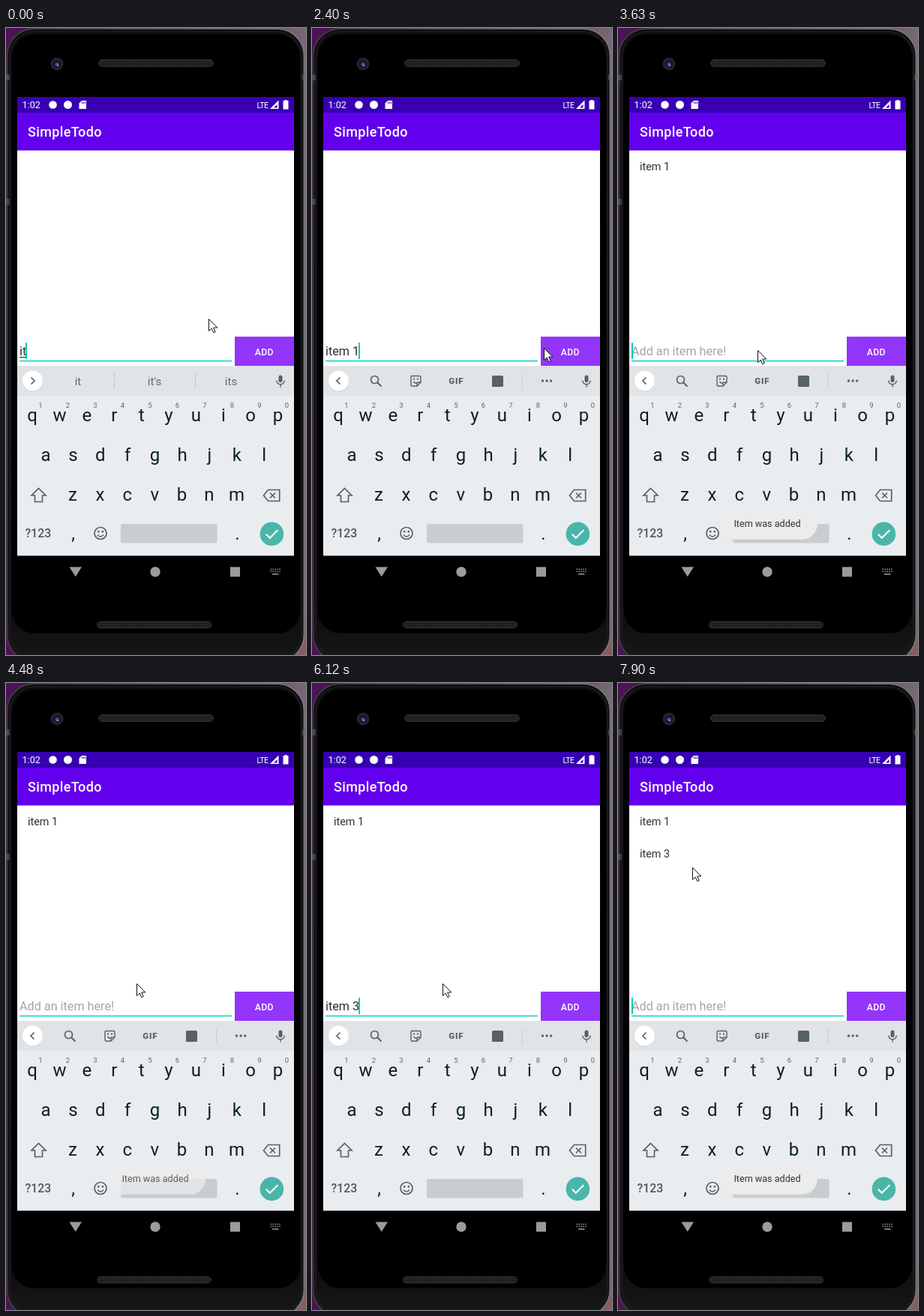
These frames come from a looping animation (400 by 837 pixels, 8 s). An HTML page:

```html
<!DOCTYPE html>
<html lang="en">
<head>
<meta charset="utf-8">
<title>Todo app demo</title>
<style>
  html, body { margin: 0; width: 100%; height: 100%; overflow: hidden; background: #24142f; }
  svg { display: block; width: 400px; height: 837px; font-family: Roboto, "Open Sans", sans-serif; }
  text { white-space: pre; }
  .mid { text-anchor: middle; }
  .key { font-size: 24px; fill: #0b2027; }
  .num { font-size: 9.5px; fill: #5c676d; }
  .word { font-size: 15px; fill: #5f6a71; }
  .item { font-size: 14.4px; fill: #303030; }
  .field { font-size: 16.2px; }
  .line { fill: none; stroke: #56626a; stroke-width: 1.7; }
  .gray { fill: #56626a; }
  .nav { fill: #9b9b9b; }
</style>
</head>
<body>
<svg viewBox="0 0 400 837">
  <defs>
    <linearGradient id="desk" x2="1" y2="0">
      <stop offset="0" stop-color="#4c1455"/><stop offset=".5" stop-color="#2a1735"/><stop offset="1" stop-color="#786878"/>
    </linearGradient>
    <linearGradient id="rim" x2="1" y2="0">
      <stop offset="0" stop-color="#3c3c3c"/><stop offset="1" stop-color="#767676"/>
    </linearGradient>
    <linearGradient id="body" x2="0" y2="1">
      <stop offset="0" stop-color="#0c0c0c"/><stop offset=".9" stop-color="#0a0a0a"/><stop offset="1" stop-color="#181818"/>
    </linearGradient>
    <pattern id="mesh" width="3" height="3" patternUnits="userSpaceOnUse">
      <rect width="3" height="3" fill="#1d1d1d"/><circle cx="1.5" cy="1.5" r=".8" fill="#323232"/>
    </pattern>
  </defs>

  <!-- phone -->
  <rect width="400" height="837" fill="url(#desk)"/>
  <path d="M370 790H400V837H370z" fill="#8a5c60"/>
  <rect x="1.5" y="1" width="396" height="845" rx="36" fill="url(#body)" stroke="url(#rim)" stroke-width="2"/>
  <rect x="5" y="5" width="389" height="837" rx="33" fill="none" stroke="#1b1b1b" stroke-width="2"/>
  <rect x="8" y="9" width="384" height="799" rx="30"/>
  <path d="M0 66H5M395 66H400M0 232H5" stroke="#6a6a6a" stroke-width="8" opacity=".5"/>
  <rect x="123.500" y="42.500" width="153" height="9" rx="4.500" fill="url(#mesh)" stroke="#303030"/>
  <rect x="121.500" y="792.500" width="152" height="8.500" rx="4.200" fill="url(#mesh)" stroke="#303030"/>
  <circle cx="68" cy="48" r="8.500" fill="#232429"/>
  <circle cx="68" cy="48" r="5" fill="#10152a"/>
  <circle cx="68" cy="48.500" r="2.500" fill="#3d4f96"/>
  <circle cx="69" cy="50" r="1" fill="#a4b4e8"/>

  <!-- app -->
  <path fill="#fff" d="M15 163H384V451H15z"/>
  <path fill="#3700b3" d="M15 92H384V113H15z"/>
  <path fill="#6200ee" d="M15 113H384V163.500H15z"/>
  <g fill="#fff">
    <text x="21.500" y="107" font-size="12.600">1:02</text>
    <circle cx="62.500" cy="102.500" r="5.300"/>
    <circle cx="82.500" cy="102.500" r="5.500"/>
    <path d="M101 97H107V108H97.500V100.500z"/>
    <path d="M101.500 98.500V101M103.500 98.500V101M105.500 98.500V101" stroke="#3700b3"/>
    <text x="334.500" y="106.500" font-size="10.500" letter-spacing="-.5">LTE</text>
    <path d="M363.500 96.500V108H352z"/>
    <path d="M361.500 102V106.500H357z" fill="#3700b3"/>
    <path d="M371.500 97V96H374.500V97H376.500V108.500H369.500V97z"/>
    <text x="29" y="145" font-size="18" font-weight="500" letter-spacing=".35">SimpleTodo</text>
  </g>
  <text id="first" class="item" x="29" y="190">item 1</text>
  <text id="second" class="item" x="29" y="233">item 3</text>
  <path id="button" d="M305 412H384V451H305z"/>
  <text class="mid" x="344.300" y="436.500" font-size="12.200" font-weight="500" letter-spacing=".4" fill="#fff">ADD</text>
  <path fill="#03d3c0" d="M18 443.700H301V445.200H18z"/>
  <text id="entry" class="field" x="18" y="437"></text>
  <rect id="compose" x="18" y="439" height="1" fill="#222"/>
  <rect id="caret" y="420" width="2" height="22" fill="#03cbb9"/>

  <!-- keyboard -->
  <path fill="#e9edf0" d="M15 451H384V705H15z"/>
  <path fill="#e0e4e7" d="M15 451H384V491H15z"/>
  <circle cx="35.500" cy="472" r="13.500" fill="#d0d4d7"/>
  <circle cx="35.500" cy="471" r="13.500" fill="#fff"/>
  <path id="chevron" class="line" d="M-2 -4.500L2.500 0L-2 4.500"/>
  <g class="gray">
    <rect x="363.500" y="463.500" width="5" height="9.500" rx="2.500"/>
    <path class="line" d="M360.700 470.500a5.300 5.300 0 0 0 10.600 0M366 476V479.500" style="stroke-width:1.400"/>
  </g>
  <g id="words">
    <path d="M144.500 460V482M252.500 460V482" stroke="#c3c8cb"/>
    <text class="word mid" x="96" y="477"></text>
    <text class="word mid" x="198" y="477"></text>
    <text class="word mid" x="300" y="477"></text>
  </g>
  <g id="tools">
    <circle class="line" cx="83.500" cy="469.500" r="5"/>
    <path class="line" d="M87 473L92.500 478.500" style="stroke-width:2"/>
    <path class="line" d="M133.500 464.500H143.500Q145 464.500 145 466V473L140 478H133.500Q132 478 132 476.500V466Q132 464.500 133.500 464.500M145 473H141Q140 473 140 474V478M135.500 472q2 3 4.500 1.500" style="stroke-width:1.400"/>
    <path class="gray" d="M135 467.500h2v2h-2zM140 467.500h2v2h-2z"/>
    <text class="gray mid" x="192.300" y="475.300" font-size="11.500" font-weight="900" letter-spacing=".8">GIF</text>
    <rect class="gray" x="240" y="464" width="15" height="15" rx="1.500"/>
    <path d="M280.500 461V482" stroke="#cbd0d3"/>
    <path d="M307.500 471H320" stroke="#56626a" stroke-width="3.400" stroke-linecap="round" stroke-dasharray="0 5.600"/>
  </g>
  <g id="keys"></g>
  <path class="line" d="M43.500 614.500L53 624H48.500V632.500H38.500V624H34z"/>
  <path class="line" d="M349.500 616.500H364.700V631.500H349.500L343.500 624zM352 620.500L359 627.500M359 620.500L352 627.500"/>
  <text x="25.500" y="680" font-size="15.800" font-weight="500" fill="#4d5960">?123</text>
  <circle class="line" cx="126" cy="674.500" r="8"/>
  <path class="line" d="M122 676.500q4 5 8 0" style="stroke-width:1.500"/>
  <path class="gray" d="M122 671h2.400v2.400h-2.400zM127.600 671h2.400v2.400h-2.400z"/>
  <rect x="153" y="662" width="128.500" height="25.500" rx="2.500" fill="#c8cdd0"/>
  <circle cx="354.400" cy="675.400" r="15.800" fill="#4bb5aa"/>
  <path d="M346.800 675.800L351.800 680.800L362.300 670.300" fill="none" stroke="#fff" stroke-width="2"/>

  <!-- navigation bar -->
  <path d="M15 704.500H384V747H15z"/>
  <path class="nav" d="M84.500 719.500H101L92.700 732.500z"/>
  <circle class="nav" cx="199" cy="726" r="6.700"/>
  <path class="nav" d="M299 719.500H312V732.500H299z"/>
  <path d="M352.500 722.500H366M352.500 725.500H366" stroke="#8d8d8d" stroke-width="1.700" stroke-dasharray="1.700 1.200"/>
  <path d="M355 729H363.500" stroke="#8d8d8d" stroke-width="1.700"/>

  <g id="toast">
    <rect x="134" y="641.500" width="132" height="42" rx="21" fill="#d9dddf" opacity=".5"/>
    <rect x="134" y="641" width="132" height="41.500" rx="20.700" fill="#ececed"/>
    <text class="mid" x="199" y="666" font-size="12.600" fill="#333">Item was added</text>
  </g>
  <path id="pointer" d="M.5 .5V16.500L4.200 13L6.800 18.700L9.200 17.600L6.700 12H11.800z" fill="#fff" stroke="#111"/>
</svg>
<script>
const LOOP = 8000;
const $ = id => document.getElementById(id);
const show = (id, on) => $(id).setAttribute('visibility', on ? 'visible' : 'hidden');

// Screen refreshes: [first, last, count]
const refreshes = [
  [0, 0, 1], [310, 310, 1], [870, 1020, 2], [1420, 1420, 1], [1980, 2970, 8], [3120, 4080, 8],
  [4200, 4200, 1], [4480, 5390, 7], [5690, 5690, 1], [5970, 6240, 3], [6610, 7600, 8], [7750, 7900, 2]
].flatMap(([a, b, n]) => Array.from({ length: n }, (_, i) => a + (b - a) * i / Math.max(1, n - 1)));

const typing = [
  [0, 'it'], [310, 'item'], [870, 'item '], [920, 'item 1'], [2520, ''], [4850, 'i'],
  [5200, 'it'], [5380, 'ite'], [5690, 'item'], [5960, 'item '], [6100, 'item 3'], [7450, '']
];
const suggestions = {
  i: ['i', 'I', "I'm"],
  it: ['it', "it's", 'its'],
  ite: ['ite', 'item', 'items'],
  item: ['item', 'items', 'itemized']
};
const path = [
  [0, 270, 388], [1900, 270, 388], [2400, 324, 442], [2750, 324, 442], [2970, 214, 447], [3257, 198, 438],
  [3500, 186, 430], [3700, 186, 430], [4080, 183, 418], [4200, 174, 401], [6500, 174, 401],
  [6751, 198, 412], [7100, 331, 440], [7600, 331, 440], [7900, 99, 246], [LOOP, 99, 246]
];
const toasts = [[2520, 4400], [7450, 9400]];
const presses = [[2500, 2800], [7400, 7700]];

const last = (list, t) => list.filter(e => e[0] <= t).pop();
const clamp = v => Math.min(1, Math.max(0, v));

function pointerAt(t) {
  const [t0, x0, y0] = last(path, t);
  const [t1, x1, y1] = path.find(p => p[0] > t);
  const k = (t - t0) / (t1 - t0);
  return [Math.round(x0 + (x1 - x0) * k), Math.round(y0 + (y1 - y0) * k)];
}

function buildKeys() {
  const label = (cls, x, y, s) => `<text class="${cls} mid" x="${x}" y="${y}">${s}</text>`;
  const row = (s, x, y) => [...s].map((c, i) => label('key', x + 36.4 * i, y, c)).join('');
  $('keys').innerHTML = row('qwertyuiop', 35, 525) + row('asdfghjkl', 53, 578) + row('zxcvbnm', 89, 631) +
    [...'1234567890'].map((c, i) => label('num', 46 + 36.5 * i, 507, c)).join('') +
    label('key', 89.5, 683, ',') + label('key', 308.5, 683, '.');
}

function draw(now) {
  const t = refreshes.filter(r => r <= now).pop();
  const [typedAt, text] = last(typing, t);
  const words = suggestions[text];

  const entry = $('entry');
  entry.textContent = text || 'Add an item here!';
  entry.setAttribute('fill', text ? '#2b2b2b' : '#a5a5a5');
  const width = text ? entry.getComputedTextLength() : 0;
  $('caret').setAttribute('x', Math.max(18, Math.round(17 + width)));
  show('caret', (t - typedAt) % 1000 < 500);
  $('compose').setAttribute('width', width);
  show('compose', words);

  show('words', words);
  show('tools', !words);
  if (words) $('words').querySelectorAll('text').forEach((e, i) => e.textContent = words[i]);
  $('chevron').setAttribute('transform', `translate(35.500 471) scale(${words ? 1 : -1} 1)`);

  show('first', t >= 2520);
  show('second', t >= 7450);
  $('button').setAttribute('fill', presses.some(([a, b]) => t >= a && t < b) ? '#9b43ff' : '#9335fb');
  $('toast').setAttribute('opacity', Math.max(...toasts.map(([a, b]) => clamp((t - a) / 300) * clamp((b + 300 - t) / 300))));
  $('pointer').setAttribute('transform', `translate(${pointerAt(t)})`);
}

buildKeys();
const start = performance.now();
(function tick() {
  draw((performance.now() - start) % LOOP);
  requestAnimationFrame(tick);
})();
</script>
</body>
</html>
```
